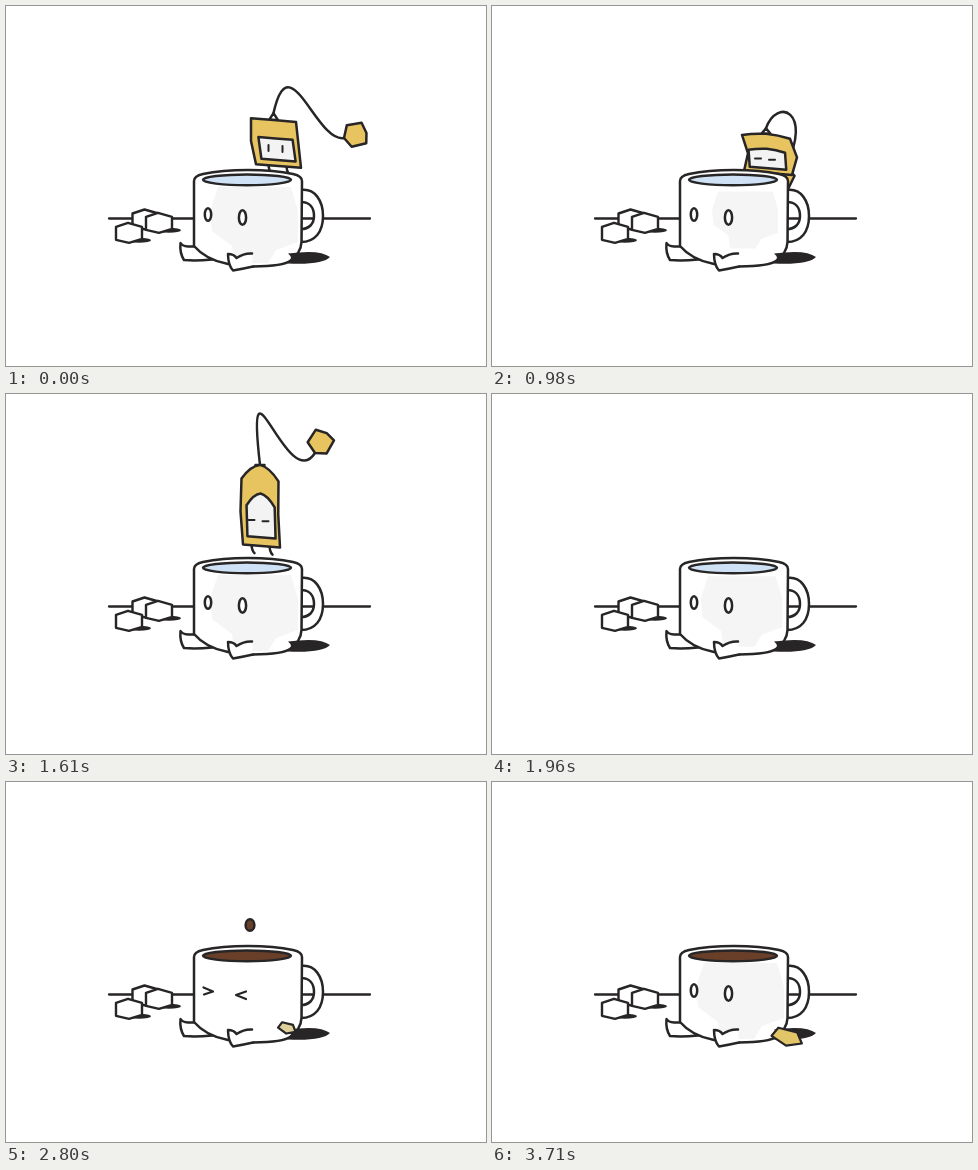
Recreate the animation shown at these times as an HTML page with a canvas. Size 480x360 px, loop 4130 ms.

```html
<!DOCTYPE html>
<html lang="en">
<head>
<meta charset="utf-8">
<title>Tea time</title>
<style>
html, body { margin: 0; width: 100%; height: 100%; overflow: hidden; background: #fff; }
canvas { display: block; width: 480px; height: 360px; }
</style>
</head>
<body>
<canvas id="stage" width="480" height="360"></canvas>
<script>
const ctx = document.getElementById('stage').getContext('2d');
const INK = '#272526', GOLD = '#e7c45f', PALE = '#f3f3f3', BLUE = '#cfe1f4', BROWN = '#693f29';
const LOOP = 4130, STEP = 70, LAST = 3710;
const SPLASH = 2030, CALM = 3150;

const lerp = (a, b, u) => a + (b - a) * u;
const clamp = v => Math.max(0, Math.min(1, v));
const smooth = u => u * u * (3 - 2 * u);
const phase = (t, from, to) => smooth(clamp((t - from) / (to - from)));
const blend = (a, b, u) => Object.fromEntries(Object.keys(a).map(k => [k, lerp(a[k], b[k], u)]));
const toss = (t, peak, top) => top + 0.00097 * (t - peak) ** 2;

// bag poses: bottom centre, size, pointed top, sideways lean, bend at the waist, closed eyes
const stand = { x: 272.5, y: 160, w: 45, h: 45.5, arch: 0, lean: 5, bend: 0, shut: 0 };
const crouch = { x: 276, y: 167, w: 48, h: 36, arch: 3, lean: 2, bend: 6, shut: 1 };
const stretch = { x: 255.5, y: 152, w: 37, h: 66, arch: 15, lean: 1.5, bend: -1, shut: 1 };
const apex = { ...stretch, x: 258.5, y: 124 };
const sunk = { ...stretch, x: 253, y: 275 };

// cord poses: end point, and the pull of the curve at the bag (ax, ay) and at the tag (bx, by)
const out = { x: 338, y: 132, ax: 16, ay: -72, bx: -28, by: 5 };
const hang = { x: 296, y: 161, ax: 11, ay: -52, bx: 10, by: -61 };
const tuck = { x: 294, y: 160, ax: 11, ay: -31, bx: 27, by: -55 };
const drift = { x: 352, y: 62, ax: 15, ay: -36, bx: -30, by: 14 };
const whip = { x: 309, y: 59, ax: -15, ay: -129, bx: -28, by: 43 };
const gone = { x: 258, y: 192, ax: 0, ay: -10, bx: 0, by: -10 };

const beats = [
  [0, stand, out], [420, stand, hang], [560, stand, hang],
  [770, crouch, tuck], [980, crouch, tuck],
  [1400, apex, drift], [1540, apex, drift],
  [1610, stretch, whip], [1890, sunk, gone], [SPLASH, sunk, gone]];

function poseAt(t) {
  const i = beats.findIndex(b => b[0] > t);
  const [t0, bagA, cordA] = beats[i - 1], [t1, bagB, cordB] = beats[i];
  const u = phase(t, t0, t1);
  return [blend(bagA, bagB, u), blend(cordA, cordB, u)];
}

// ---- drawing helpers
function path(d, fill, width = 2.5) {
  const p = new Path2D(d);
  if (fill) { ctx.fillStyle = fill; ctx.fill(p); }
  if (width) { ctx.lineWidth = width; ctx.strokeStyle = INK; ctx.stroke(p); }
}
const poly = (pts, fill, width) => path(`M${pts.join('L')}Z`, fill, width);
const line = (x0, y0, x1, y1, width) => path(`M${x0} ${y0}L${x1} ${y1}`, null, width);
function oval(x, y, rx, ry, fill, width) {
  path(`M${x - rx} ${y}a${rx} ${ry} 0 1 1 ${2 * rx} 0a${rx} ${ry} 0 1 1 ${-2 * rx} 0Z`, fill, width);
}
function placed(x, y, draw, angle = 0, scale = 1) {
  ctx.save();
  ctx.translate(x, y);
  ctx.rotate(angle);
  ctx.scale(scale, scale);
  draw();
  ctx.restore();
}

// ---- scene parts
function cube(x, y) {
  oval(x + 23, y + 13.5, 12, 2.5, INK, 0);
  placed(x, y, () => path('M0 0L12 -4L26 0V12L13 16L0 13Z', '#fff', 2.4));
}

function backdrop() {
  line(103, 212.5, 364, 212.5, 2.3);
  cube(126.5, 207.5);
  cube(140, 210.8);
  cube(110, 220.8);
  // the ground line shows through the handle
  path('M295 184C309 182 317 195 317 210C317 226 309 236 295 236V223C303 223 308 218 308 210C308 201 303 196 295 196Z', '#fff');
}

function cordAndTag(x, y, c) {
  placed(c.x, c.y, () => path('M0 0L5 -12H20L23 -1L21 9L6 10Z', GOLD), Math.atan2(-c.by, -c.bx));
  path(`M${x} ${y}C${x + c.ax} ${y + c.ay} ${c.x + c.bx} ${c.y + c.by} ${c.x} ${c.y}`);
}

function bag(t) {
  const [b, cord] = poseAt(t);
  const at = (x, y) => [b.x + x, b.y + y + 0.08 * x];
  const side = b.w / 2, face = b.w * 0.38, brow = -b.lean * 0.6;
  const [topX, topY] = at(-b.lean, -b.h - b.arch);
  const knob = 7 * (1 - b.arch / 15);

  cordAndTag(topX, topY - knob, cord);
  poly([[topX - 4.5, topY], [topX, topY - knob], [topX + 4.5, topY]], '#fff');
  for (const x of [-10, 8]) path(`M${at(x, -2)}q0 7 3 10`);

  // flat or pointed top edge with soft shoulders
  const roof = (x, half, y, rise) =>
    `M${at(x - half, y)}Q${at(x - half * 0.5, y - rise * 0.9)} ${at(x, y - rise)}Q${at(x + half * 0.5, y - rise * 0.9)} ${at(x + half, y)}`;
  path(`${roof(-b.lean, side, -b.h, b.arch)}L${at(side - b.lean / 2 + b.bend, -b.h / 2)}L${at(side, 0)}` +
    `L${at(-side, 0)}L${at(-side - b.lean + b.bend, -b.h / 2)}Z`, GOLD);
  path(`${roof(brow, face, -b.h * 0.6, b.arch * 0.85)}L${at(face, -b.h * 0.13)}L${at(-face, -b.h * 0.13)}Z`, PALE);

  for (const side of [-1, 1]) {
    const [x, y] = at(side * 7 - 3, -b.h * 0.38);
    const dx = 3 * b.shut, dy = 3 * (1 - b.shut);
    line(x - dx, y - dy, x + dx, y + dy, 2);
  }
}

function shade(t) {
  const flare = phase(t, 560, 980) * (1 - phase(t, 980, 1400)) * 0.25;
  const size = 1 - flare - phase(t, 1820, 2660) + phase(t, 2870, 3500);
  const blob = 'M-56 -18L17 -18L24 6V37L2 45L-6 58H-40L-42 41L-62 26L-64 6Z';
  if (size > 0.02) placed(268, 199, () => path(blob, '#f5f5f5', 0), 0, size);
}

function eyes(t) {
  if (t >= SPLASH && t < CALM) {
    path('M197.5 205.5L207 209.5L198 212.5M240 209.5L230 213L240 217', null, 2.2);
  } else {
    oval(202, 208.5, 3.2, 6.3, '#fff');
    oval(236.5, 211.5, 3.6, 7.3, '#fff');
  }
}

function mug(t) {
  const kick = phase(t, SPLASH, 2170) * (1 - phase(t, 2240, 2520));
  const body = 'M188 240L188 175Q188 170 197 168C222 162.5 262 162.5 287 168Q296 170 296 175L295.5 236Q295 247 284 255Q278 260 247 260.5L222 258Q200 254 188 240Z';
  placed(-4 * kick, 0, () => path('M192 240.5H182Q176 240 174.5 237Q173.5 247 178 254Q190 255 206 253.5', '#fff'));
  path(body, '#fff', 0);
  shade(t);
  path(body);
  placed(-2 * kick, 0, () => path('M246 247.5Q238 247 230.5 252Q228 248 222 248Q222 259 227 264.5Q236 263 247 260.5', '#fff'));
  path('M282 247.5Q314 243 324 251Q317 259 282 257.5Q288 252 282 247.5Z', INK, 0);

  oval(241, 173.8, 44, 5.4, t < SPLASH ? BLUE : BROWN);
  if (t >= SPLASH && t < 2600) {
    const w = 2.5 * Math.cos((t - 2240) / 110);
    path(`M206 177Q215 ${175 - w} 225 177T246 177Q264 ${177 + w / 2} 281 174.5`, null, 1.6);
  }
  eyes(t);
}

// things in front of the back rim, hidden below the tea's near edge
function insideMug(draw) {
  ctx.save();
  ctx.beginPath();
  ctx.rect(0, 0, 480, 173.8);
  ctx.ellipse(241, 173.8, 43, 4.4, 0, 0, Math.PI);
  ctx.clip();
  draw();
  ctx.restore();
}

function drop(t, peak, top, r) {
  if (Math.abs(t - peak) < 185) oval(244, toss(t, peak, top), r, r * 0.5 + 3.6, BROWN);
}

function looseTag(t) {
  if (t < 2150) return;
  const fall = clamp((t - 2240) / 560), land = phase(t, 2800, 2940);
  const bounce = 5 * Math.sin(Math.PI * clamp((t - 2812) / 200));
  const x = 273 + 8 * fall + 14 * land;
  const y = Math.min(255, toss(t, 2412, 100)) - bounce;
  const rx = 13 - 3.5 * fall + 7 * land, ry = 12 - 6.5 * fall + 3 * land;
  const corners = Array.from({ length: 5 }, (_, i) => {
    const a = -2.3 + Math.PI * 2 * (i / 5 + fall);
    return [rx * Math.cos(a), ry * Math.sin(a)];
  });
  const edgeOn = t > 2600 && t < 2870;
  placed(x, y, () => poly(corners, edgeOn ? '#ded19b' : '#e2c568', 2.2), 0.3);
}

function render(t) {
  ctx.clearRect(0, 0, 480, 360);
  backdrop();
  if (t < 1400) bag(t);
  mug(t);
  insideMug(() => {
    if (t >= 1400 && t < SPLASH) bag(t);
    drop(t, 2311, 140, 6.3);
    drop(t, 2780, 142.6, 4.4);
  });
  looseTag(t);
}

ctx.lineCap = ctx.lineJoin = 'round';
const start = performance.now();
function tick() {
  const t = (performance.now() - start) % LOOP;
  render(Math.min(LAST, Math.floor(t / STEP) * STEP));
  requestAnimationFrame(tick);
}
tick();
</script>
</body>
</html>
```
